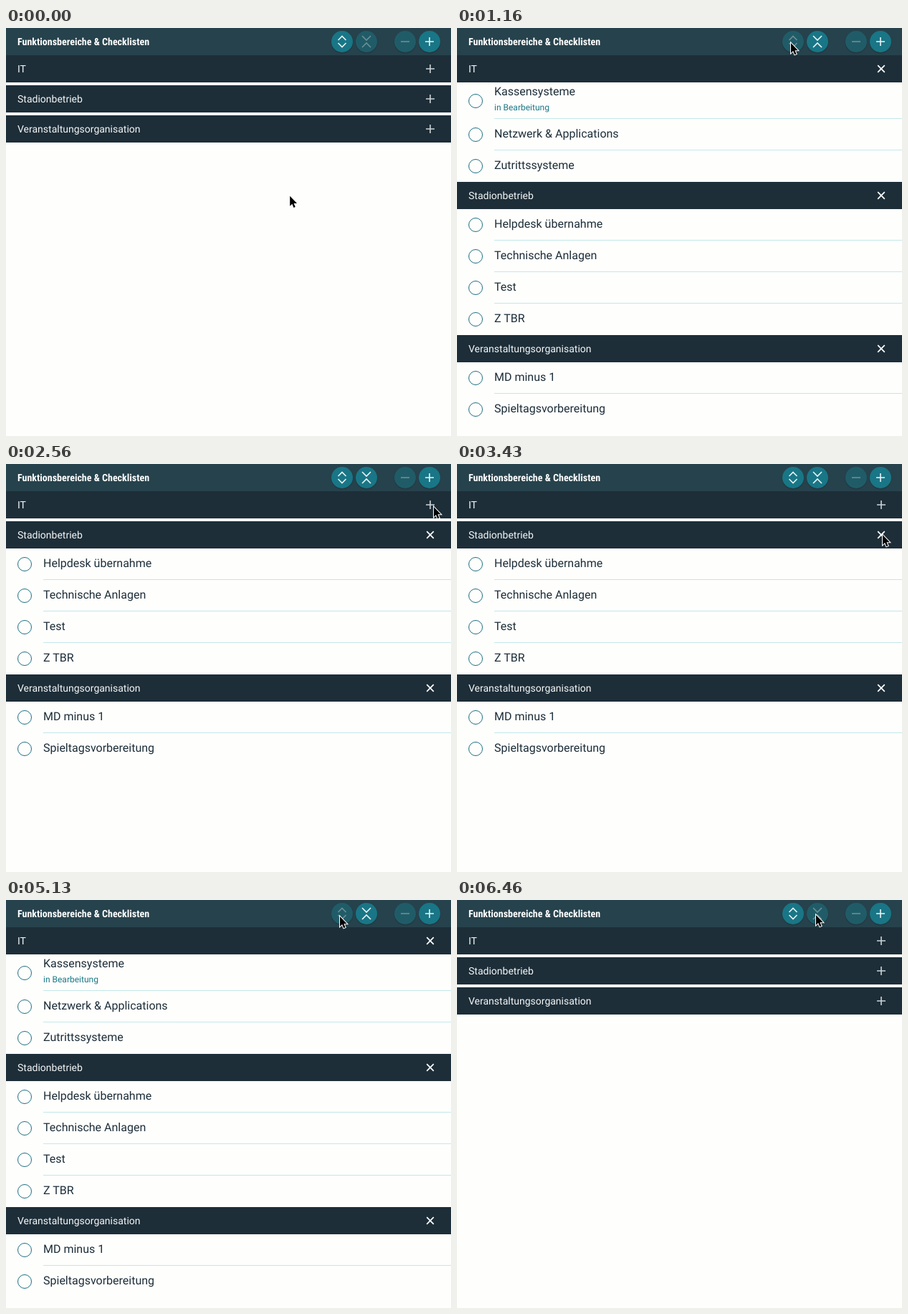
An HTML page for the animation above (7.3 s loop, 621 px wide and 570 px high).

```html
<!DOCTYPE html>
<html lang="de">
<head>
<meta charset="utf-8">
<title>Checklisten</title>
<style>
  html, body { margin: 0; width: 100%; height: 100%; overflow: hidden; background: #fefefd; }
  svg { display: block; font-family: Roboto, sans-serif; text-rendering: geometricPrecision; }
  path { fill: none; }
  .title { font: 700 14px "Roboto Condensed", Roboto, sans-serif; font-stretch: 75%; fill: #fff; }
  .label { font-size: 14px; fill: #f4f6f6; }
  .item { font-size: 16px; fill: #1d2e39; }
  .note { font-size: 12px; fill: #1b7887; }
  .bar { fill: #1d2e39; }
  .line { fill: #c3e8ea; }
  .ring { fill: none; stroke: #1b6f80; }
  .pointer { fill: #000; stroke: #fff; stroke-width: 2; paint-order: stroke; }
</style>
</head>
<body>
<svg id="stage" width="621" height="570" viewBox="0 0 621 570"></svg>
<script>
const LOOP = 7300;
const WIDTH = 621, BAR = 38, GAP = 4, ROW = 44, NOTE_ROW = 51;

const SECTIONS = [
  { name: "IT", items: ["Kassensysteme", "Netzwerk & Applications", "Zutrittssysteme"], note: "in Bearbeitung" },
  { name: "Stadionbetrieb", items: ["Helpdesk übernahme", "Technische Anlagen", "Test", "Z TBR"] },
  { name: "Veranstaltungsorganisation", items: ["MD minus 1", "Spieltagsvorbereitung"] }
];

const expandAll = open => open.map(() => true);
const collapseAll = open => open.map(() => false);
const toggle = index => open => open.map((state, i) => i === index ? !state : state);

// The pointer travels to each control, rests there and clicks.
const HOME = { x: 396, y: 235 };
const VISITS = [
  { leave: 0, arrive: 860, click: 1060, x: 466, y: 21, action: expandAll },
  { leave: 1360, arrive: 2260, click: 2560, x: 597, y: 60, action: toggle(0) },
  { leave: 2860, arrive: 3430, click: 3760, x: 594, y: 99, action: toggle(1) },
  { leave: 3900, arrive: 4660, click: 5100, x: 466, y: 23, action: expandAll },
  { leave: 5500, arrive: 5830, click: 6400, x: 501, y: 21, action: collapseAll }
];

const stage = document.getElementById("stage");

function add(parent, tag, attrs, text) {
  const node = document.createElementNS("http://www.w3.org/2000/svg", tag);
  for (const key in attrs) node.setAttribute(key, attrs[key]);
  if (text) node.textContent = text;
  parent.appendChild(node);
  return node;
}

const show = (node, visible) => node.setAttribute("display", visible ? "inline" : "none");
const moveTo = (node, x, y) => node.setAttribute("transform", `translate(${x} ${y})`);

function addButton(x, icon) {
  const group = add(stage, "g", { transform: `translate(${x} ${BAR / 2})` });
  add(group, "circle", { cy: 1, r: 15.5, fill: "#000", opacity: 0.12 });
  const disc = add(group, "circle", { r: 15 });
  const mark = add(group, "path", { d: icon, "stroke-width": 1.6 });
  return enabled => {
    disc.setAttribute("fill", enabled ? "#197686" : "#205c68");
    mark.setAttribute("stroke", enabled ? "#e9f3f4" : "#6b8f96");
  };
}

function addSection({ name, items, note }) {
  const group = add(stage, "g", {});
  add(group, "rect", { width: WIDTH, height: BAR, class: "bar" });
  add(group, "text", { x: 16, y: 24, class: "label" }, name);
  const plus = add(group, "path", { d: "M586 19h12M592 13v12", stroke: "#cdd3d5", "stroke-width": 1.6 });
  const cross = add(group, "path", { d: "M587.2 14.2l9.6 9.6M596.8 14.2l-9.6 9.6", stroke: "#fff", "stroke-width": 1.7 });
  const body = add(group, "g", {});
  let y = BAR;
  items.forEach((item, i) => {
    const noted = note && i === 0;
    add(body, "circle", { cx: 26, cy: y + (noted ? 26 : 22), r: 9.5, class: "ring" });
    add(body, "text", { x: 52, y: y + (noted ? 18 : 26), class: "item" }, item);
    if (noted) add(body, "text", { x: 52, y: y + 39, class: "note" }, note);
    y += noted ? NOTE_ROW : ROW;
    if (i < items.length - 1) add(body, "rect", { x: 52, y: y - 1, width: WIDTH - 52, height: 1, class: "line" });
  });
  return (top, open) => {
    moveTo(group, 0, top);
    show(plus, !open);
    show(cross, open);
    show(body, open);
    return top + (open ? y : BAR + GAP);
  };
}

add(stage, "rect", { width: WIDTH, height: BAR, fill: "#26424c" });
const title = add(stage, "text", { x: 16, y: 24, class: "title" }, "Funktionsbereiche & Checklisten");

const setExpand = addButton(469, "M-5.5 -2L0 -7.5L5.5 -2M-5.5 2L0 7.5L5.5 2");
const setCollapse = addButton(503, "M-6 -8L0 -2L6 -8M-6 8L0 2L6 8");
addButton(557, "M-6 0H6")(false);
addButton(591, "M-6 0H6M0 -6V6")(true);
const sections = SECTIONS.map(addSection);
const pointer = add(stage, "path", { d: "M0 0V14L3.1 11L5.3 16.2L7.6 15.2L5.4 10.2H9.8Z", class: "pointer" });
pointer.style.fill = "#000";

// Sideways motion starts fast and settles; vertical motion is steady.
function pointerAt(t) {
  let { x, y } = HOME;
  for (const visit of VISITS) {
    const p = Math.min(1, Math.max(0, (t - visit.leave) / (visit.arrive - visit.leave)));
    x += (visit.x - x) * (1 - (1 - p) ** 2.5);
    y += (visit.y - y) * p;
  }
  return [x, y];
}

function render(t) {
  const open = VISITS.filter(visit => visit.click <= t)
    .reduce((state, visit) => visit.action(state), SECTIONS.map(() => false));
  setExpand(!open.every(Boolean));
  setCollapse(open.some(Boolean));
  sections.reduce((top, place, i) => place(top, open[i]), BAR);
  moveTo(pointer, ...pointerAt(t));
}

const begin = performance.now();
function tick() {
  render((performance.now() - begin) % LOOP);
  requestAnimationFrame(tick);
}
tick();
</script>
</body>
</html>
```
